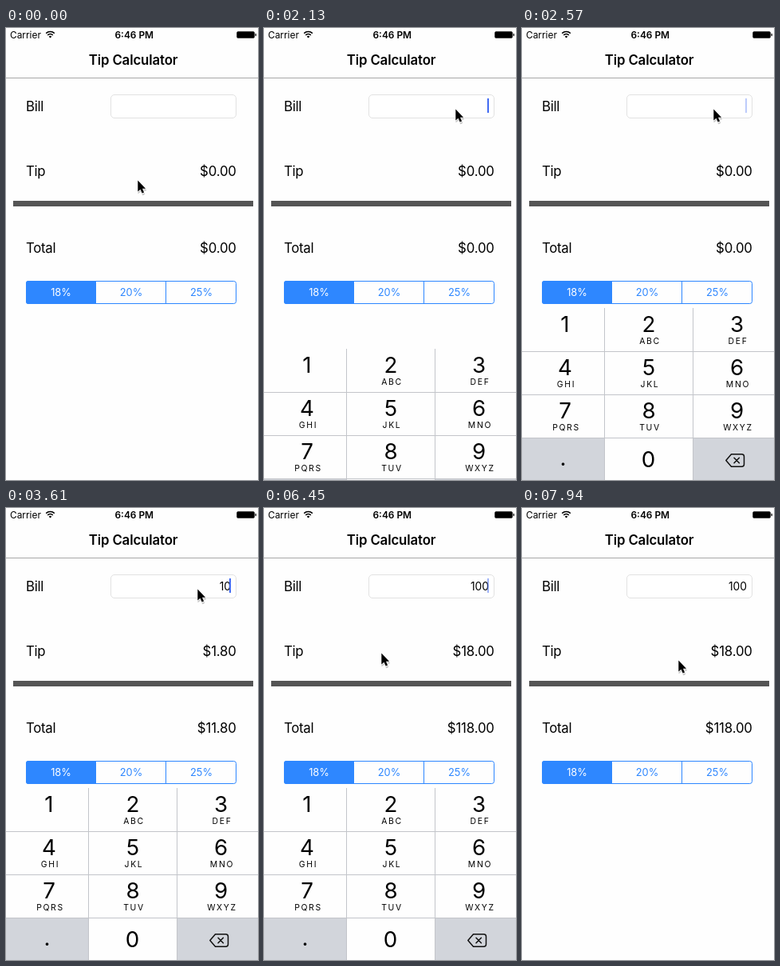
Animation, 316 px wide and 565 px high, one loop 8 s. Source, as an HTML page:

```html
<!DOCTYPE html>
<html lang="en">
<head>
<meta charset="utf-8">
<title>Tip Calculator</title>
<style>
  html, body { margin: 0; width: 100%; height: 100%; overflow: hidden; background: #fefefe; }
  svg { display: block; width: 100vw; height: 100vh; }
  text { font-family: Inter, Roboto, sans-serif; }
  .status { font-size: 11.9px; }
  .bold { font-weight: 600; }
  .label { font-size: 16.8px; letter-spacing: -.3px; }
  .title { font-size: 16.8px; letter-spacing: -.12px; }
  .amount { font-size: 16.8px; letter-spacing: -.15px; }
  .bill { font-size: 13.8px; letter-spacing: -.1px; }
  .seg { font-size: 12.8px; fill: #2e87ff; }
  .digit { font-size: 27.7px; }
  .letters { font-size: 10.4px; letter-spacing: 1.7px; }
  .mid { text-anchor: middle; }
  .end { text-anchor: end; }
</style>
</head>
<body>
<svg viewBox="0 0 316 565">
  <rect width="316" height="565" fill="#fefefe"/>

  <text class="status" x="5" y="12.5">Carrier</text>
  <g fill="none" stroke="#000" stroke-width="1.5">
    <path d="M50.2 6.6a7.6 7.6 0 0 1 10.6 0M52.2 8.9a4.8 4.8 0 0 1 6.6 0"/>
    <path d="M55.5 12.6l-1.8-1.9a2.6 2.6 0 0 1 3.6 0z" fill="#000" stroke="none"/>
  </g>
  <text class="status bold mid" x="160.8" y="12.5">6:46 PM</text>
  <rect x="289.5" y="4.5" width="22" height="8" rx="1.5" stroke="#000" stroke-opacity=".45"/>
  <rect x="312.5" y="7" width="1.3" height="3.2" rx=".6"/>
  <text class="title bold mid" x="159.5" y="46">Tip Calculator</text>
  <rect y="62" width="316" height="1" fill="#a9a9a9"/>

  <text class="label" x="25" y="103.5">Bill</text>
  <rect x="131.5" y="83.5" width="157" height="29" rx="4.5" fill="#fff" stroke="#e2e2e2"/>
  <text id="bill" class="bill end" x="281.8" y="102.5"></text>
  <rect id="caret" x="280" y="88" width="2" height="18" fill="#426bf2"/>
  <text class="label" x="25" y="184.5">Tip</text>
  <text id="tip" class="amount end" x="288.8" y="184.5"></text>
  <rect x="9" y="216" width="301" height="7" fill="#555"/>
  <text class="label" x="25" y="280.5">Total</text>
  <text id="total" class="amount end" x="288.8" y="280.5"></text>

  <path d="M113 316H28a3 3 0 0 0-3 3v23a3 3 0 0 0 3 3h85z" fill="#2e87ff"/>
  <rect x="25.5" y="316.5" width="263" height="28" rx="2.8" fill="none" stroke="#2e87ff"/>
  <path d="M200.5 316v29" stroke="#2e87ff"/>
  <text class="seg mid" x="69" y="335.3" style="fill:#fff">18%</text>
  <text class="seg mid" x="157" y="335.3">20%</text>
  <text class="seg mid" x="245" y="335.3">25%</text>

  <g id="keypad">
    <rect y="350" width="316" height="216" fill="#fefefe"/>
    <path d="M0 512h103v54H0zM215 512h101v54H215z" fill="#d2d5db"/>
    <path d="M0 404.5h316M0 458.5h316M0 512.5h316M103.5 350v216M214.5 350v216" stroke="#c3c5ca"/>
    <g id="keys"></g>
    <g fill="none" stroke="#111" stroke-width="1.5" stroke-linejoin="round" stroke-linecap="round">
      <path d="M262.5 532.8H275.5a3 3 0 0 1 3 3V545.2a3 3 0 0 1-3 3H262.5L255.8 540.5z"/>
      <path d="M266 537.2l6.4 6.6m0-6.6l-6.4 6.6"/>
    </g>
  </g>

  <g id="cursor">
    <path d="M.8 1.6v14l3.3-2.8 2.3 5 2.4-1.1-2.2-4.8h4.2z" opacity=".22" stroke="#000"/>
    <path d="M.3-.5v14l3.2-2.8 2.2 4.9 2.4-1.1-2.1-4.8h4.1z" stroke="#fff" stroke-width="1.6" paint-order="stroke"/>
  </g>
</svg>
<script>
const LOOP = 8000, TICK = 149, FIRST_TICK = 480;
const FOCUS = 1970, BLUR = 6660, KEYPAD_HEIGHT = 216;
const PRESSES = [3160, 3600, 3900];

// Pointer legs: start, end, then the point reached
const HOME = [165, 191];
const LEGS = [
  [400, 1523, 240, 102],
  [4430, 5248, 155, 328],
  [5844, 6142, 147, 182],
  [7483, 7632, 104, 305],
  [7632, 7930, 196, 191]
];

const $ = id => document.getElementById(id);
const clamp = v => Math.min(1, Math.max(0, v));
const ease = p => (1 - Math.cos(Math.PI * clamp(p))) / 2;
const money = v => '$' + v.toFixed(2);

function place(el, x, y) {
  el.setAttribute('transform', `translate(${Math.round(x)} ${Math.round(y)})`);
}

function addKey(digit, x, y, letters = '') {
  $('keys').innerHTML +=
    `<text class="digit mid" x="${x}" y="${y}">${digit}</text>` +
    `<text class="letters mid" x="${x + 1.5}" y="${y + 15}">${letters}</text>`;
}

'|ABC|DEF|GHI|JKL|MNO|PQRS|TUV|WXYZ'.split('|').forEach((letters, i) =>
  addKey(i + 1, [54, 159, 269.5][i % 3], 380 + 54 * Math.floor(i / 3), letters));
addKey('.', 51.5, 547);
addKey('0', 158.5, 549);

// Critically damped spring: the share of the way left after a given time
function springLeft(age, tau) {
  const x = Math.max(0, age) / tau;
  return (1 + x) * Math.exp(-x);
}

function pointer(t) {
  let [x, y] = HOME;
  for (const [start, end, toX, toY] of LEGS) {
    const p = ease((t - start) / (end - start));
    x += (toX - x) * p;
    y += (toY - y) * p;
  }
  return [x, y];
}

// Solid just after focus or a key press, then a soft blink
function caretOpacity(t) {
  if (t < FOCUS || t > BLUR) return 0;
  const peak = 335, period = 980;
  const age = t - [FOCUS, ...PRESSES].filter(s => s <= t).pop();
  return age < peak ? 1 : clamp(.5 + 1.5 * Math.cos(2 * Math.PI * (age - peak) / period));
}

function render(time) {
  const t = FIRST_TICK + TICK * Math.floor((time - FIRST_TICK) / TICK);

  const typed = PRESSES.filter(s => s <= t).length;
  const bill = typed ? 10 ** (typed - 1) : 0;
  const tip = bill * .18;
  $('bill').textContent = bill || '';
  $('tip').textContent = money(tip);
  $('total').textContent = money(bill + tip);

  $('caret').setAttribute('opacity', caretOpacity(t));
  const hidden = t < BLUR ? springLeft(t - FOCUS, 54) : 1 - springLeft(t - BLUR, 30);
  place($('keypad'), 0, KEYPAD_HEIGHT * hidden);
  place($('cursor'), ...pointer(t));
}

const begin = performance.now();
function frame() {
  render((performance.now() - begin) % LOOP);
  requestAnimationFrame(frame);
}
frame();
</script>
</body>
</html>
```
